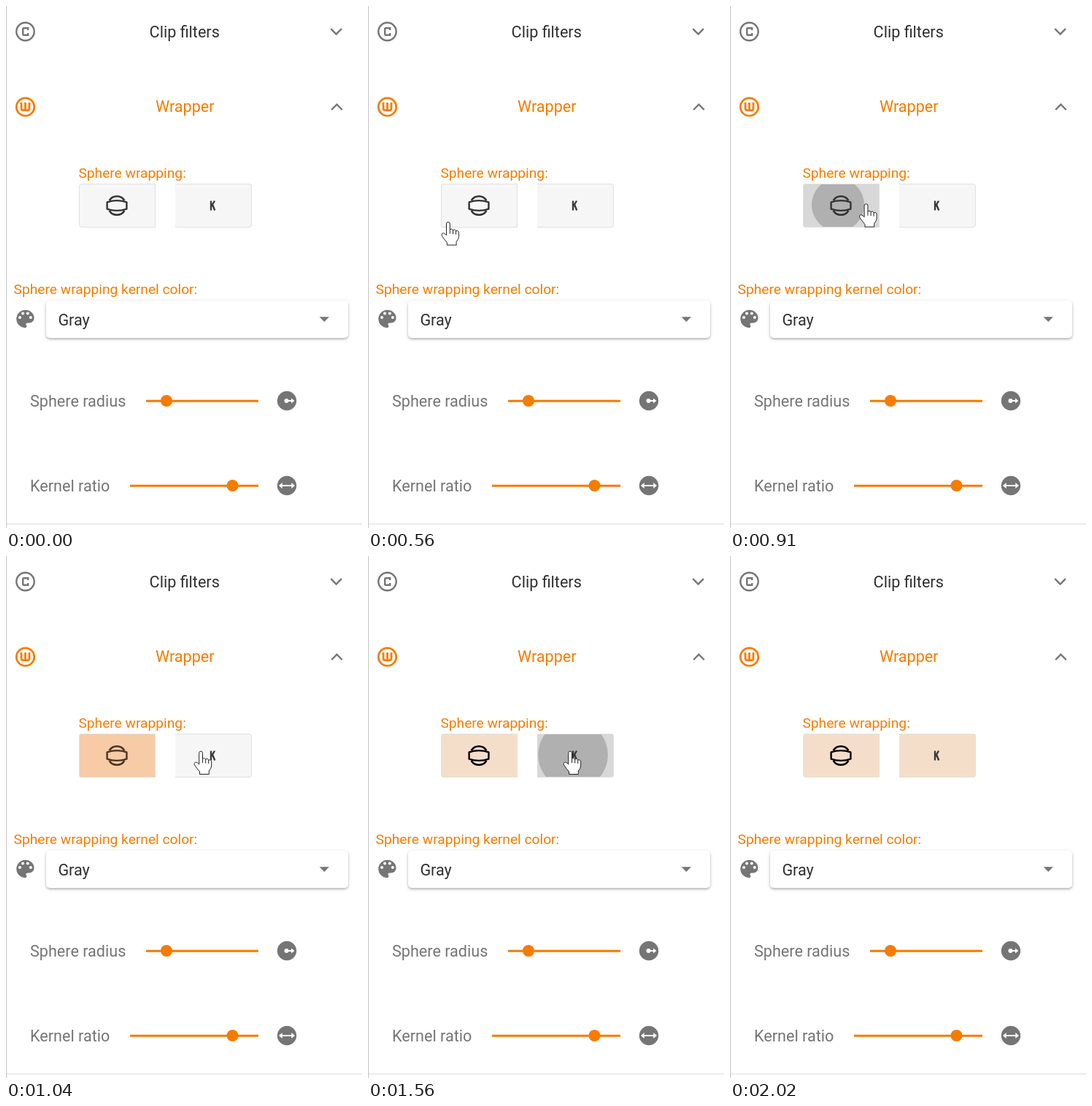
An HTML page that plays this animation: 488x714 px, repeating every 2450 ms.

```html
<!DOCTYPE html>
<html lang="en">
<head>
<meta charset="utf-8">
<title>Wrapper panel</title>
<style>
html, body { margin: 0; width: 100%; height: 100%; overflow: hidden; background: #fff; }
svg { display: block; font: 21.6px Roboto, Arial, sans-serif; }
.label { font-size: 19.2px; fill: #f57c00; }
.line { fill: none; stroke-width: 2.4; }
.grey { fill: #757575; }
.edge { fill: none; stroke: #e0e0e0; }
.cursor { fill: #fff; stroke: #222; stroke-linejoin: round; }
.select { fill: #fff; filter: drop-shadow(0 2px 1.4px #0003) drop-shadow(0 1px 2.5px #0002); }
</style>
</head>
<body>
<svg width="488" height="714" viewBox="0 0 488 714">
  <defs>
    <clipPath id="clip1"><path d="M205 243H104a4 4 0 0 0-4 4V299a4 4 0 0 0 4 4H205Z"/></clipPath>
    <clipPath id="clip2"><path d="M232 243H333a4 4 0 0 1 4 4V299a4 4 0 0 1-4 4H232Z"/></clipPath>
  </defs>
  <path d="M.5 0V714" stroke="#c4c4c4"/>
  <path d="M1 708.5H488" stroke="#dcdcdc"/>

  <!-- section headers -->
  <g class="line" stroke="#757575">
    <circle cx="26.5" cy="35" r="12.2"/>
    <path d="M30.2 33V30.2H24.3Q23.2 30.2 23.2 31.3V38.7Q23.2 39.8 24.3 39.8H30.2V37"/>
    <path d="M445.4 31.2L452.7 38.5L460 31.2M446.2 142L453.5 134.7L460.8 142"/>
  </g>
  <text x="196.6" y="43" fill="#303030">Clip filters</text>
  <g class="line" stroke="#f57c00">
    <circle cx="26.5" cy="138" r="12.2" stroke-width="2.8"/>
    <path d="M21 132V140Q21 142.6 23.6 142.6H29.4Q32 142.6 32 140V132M26.5 132V142" stroke-width="2.8"/>
  </g>
  <text x="205" y="145" fill="#f57c00">Wrapper</text>

  <!-- toggle buttons -->
  <text class="label" x="99.4" y="235">Sphere wrapping:</text>
  <g clip-path="url(#clip1)">
    <rect id="fill1" x="100" y="243" width="105" height="60"/>
    <circle id="ripple1" cx="148" cy="272" r="0"/>
  </g>
  <path class="edge" d="M204.5 243.5H104a3.5 3.5 0 0 0-3.5 3.5V299a3.5 3.5 0 0 0 3.5 3.5H204.5Z"/>
  <path id="sphere" class="line" stroke-linejoin="round" d="M141.6 266A12.3 12.3 0 0 1 162.4 266M141.6 280A12.3 12.3 0 0 0 162.4 280M138.6 268.4Q152 263.8 165.4 268.4V277.6Q152 282.2 138.6 277.6Z"/>
  <g clip-path="url(#clip2)">
    <rect id="fill2" x="232" y="243" width="105" height="60"/>
    <circle id="ripple2" cx="281" cy="272" r="0"/>
  </g>
  <path class="edge" d="M232 243.5H333a3.5 3.5 0 0 1 3.5 3.5V299a3.5 3.5 0 0 1-3.5 3.5H232"/>
  <path class="line" d="M281 266.5V279.5M286 266.5L281.6 274M283 271.5L286.2 279.5" stroke="#3a3a3a" stroke-width="2"/>

  <!-- colour select -->
  <text class="label" x="10.6" y="394">Sphere wrapping kernel color:</text>
  <g transform="translate(10.2 411.8) scale(1.35)">
    <path class="grey" d="M12 3a9 9 0 0 0 0 18c.83 0 1.5-.67 1.5-1.5 0-.39-.15-.74-.39-1.01-.23-.26-.38-.61-.38-.99 0-.83.67-1.5 1.5-1.5H16c2.76 0 5-2.24 5-5 0-4.42-4.03-8-9-8z"/>
    <g fill="#fff"><circle cx="6.5" cy="10.5" r="1.5"/><circle cx="9.5" cy="6.5" r="1.5"/><circle cx="14.5" cy="6.5" r="1.5"/><circle cx="17.5" cy="10.5" r="1.5"/></g>
  </g>
  <rect class="select" x="55" y="403" width="414" height="51" rx="5"/>
  <text x="71.4" y="437" fill="#303030">Gray</text>
  <path class="grey" d="M429.7 425.3H443L436.3 432Z"/>

  <!-- sliders -->
  <text class="grey" x="33" y="548">Sphere radius</text>
  <text class="grey" x="33" y="664">Kernel ratio</text>
  <path d="M192 540.3H346M170 656.3H346" stroke="#f57c00" stroke-width="3"/>
  <g fill="#f57c00"><circle cx="220" cy="540" r="8"/><circle cx="310.5" cy="656" r="8"/></g>
  <g class="grey"><circle cx="385" cy="540" r="13.2"/><circle cx="385" cy="656" r="13.2"/></g>
  <g fill="#fff">
    <circle cx="384.5" cy="540" r="3"/>
    <path d="M384 539H391V536.5L395.5 540L391 543.5V541H384Z"/>
    <path d="M374 656L378.7 652V655H391.3V652L396 656L391.3 660V657H378.7V660Z"/>
  </g>

  <circle id="glow" r="18" fill="#fff000" fill-opacity=".55"/>
  <path id="arrow" class="cursor" d="M0 0V23L5.3 18L9 26.3L12.7 24.7L9.2 16.6H16.4Z"/>
  <g id="hand" class="cursor">
    <path d="M-2.3 18V2.5a2.4 2.4 0 0 1 4.8 0V10.5Q4.5 8 6.7 11Q9 9 10.7 12Q14.5 11 14.7 15V20Q14.7 23 11.3 27V31.5H-1.5V28Q-5 24-8.5 18.8Q-9.6 15.5-6.5 15Q-4.5 15.5-2.3 18Z"/>
    <path d="M2.5 10.5V16M6.7 11V16.5M10.7 12V17" fill="none"/>
  </g>
</svg>
<script>
const LOOP = 2450, ENTER = 130, LEAVE = 1790;
const IDLE = [246, 246, 246], HOVER = [232, 232, 232], FOCUS = [216, 216, 216];
const CHECKED = [246, 203, 165], RESTING = [245, 222, 201];
const INK = [51, 51, 51], BROWN = [74, 51, 32], BLACK = [0, 0, 0];

// Each glide bends from the previous stop past a control point to the next stop.
const start = [421, 698];
const glides = [
  { from: ENTER, to: 290, bend: [150, 450], stop: [97, 348] },
  { from: 340, to: 660, bend: [70, 310], stop: [148, 272] },
  { from: 850, to: 1040, bend: [208, 270], stop: [267, 267] },
  { from: 1070, to: 1560, bend: [272, 267], stop: [277, 267] },
  { from: 1590, to: LEAVE, bend: [390, 300], stop: [461, 740] }
];
const buttons = [
  { id: 1, hover: 650, down: 740, up: 850 },
  { id: 2, hover: 1180, down: 1440, up: 1465 }
];

const el = id => document.getElementById(id);
const set = (id, attrs) => {
  for (const name in attrs) el(id).setAttribute(name, attrs[name]);
};
const ramp = (t, from, to) => Math.min(1, Math.max(0, (t - from) / (to - from)));
const mix = (a, b, k) => a.map((v, i) => v + (b[i] - v) * k);
const rgb = color => `rgb(${color.map(Math.round)})`;

function pointerAt(t) {
  let pos = start;
  for (const { from, to, bend, stop } of glides) {
    const k = ramp(t, from, to);
    pos = mix(mix(pos, bend, k), mix(bend, stop, k), k);
  }
  return pos;
}

function drawButton({ id, hover, up }, t) {
  const age = t - up;
  const checking = ramp(age, 125, 185), settling = ramp(age, 220, 380);
  let fill = mix(IDLE, HOVER, ramp(t, hover, hover + 70));
  fill = mix(fill, FOCUS, ramp(age, 0, 30));
  fill = mix(fill, CHECKED, checking);
  set("fill" + id, { fill: rgb(mix(fill, RESTING, settling)) });
  set("ripple" + id, {
    r: 53 * (1 - (1 - ramp(age, 0, 140)) ** 2),
    opacity: .19 * (1 - checking)
  });
  if (id === 1) set("sphere", { stroke: rgb(mix(mix(INK, BROWN, checking), BLACK, settling)) });
}

function draw() {
  const t = performance.now() % LOOP;
  const [x, y] = pointerAt(t);
  const shown = t >= ENTER && t < LEAVE;
  const over = y > 243 && y < 303 && (x > 100 && x < 205 || x > 232 && x < 337);
  const pressed = buttons.some(b => t >= b.down && t < b.up);
  const place = (id, visible) => set(id, {
    transform: `translate(${x} ${y})`,
    visibility: visible ? "visible" : "hidden"
  });
  place("arrow", shown && !over);
  place("hand", shown && over);
  place("glow", pressed);
  buttons.forEach(b => drawButton(b, t));
  requestAnimationFrame(draw);
}
draw();
</script>
</body>
</html>
```
